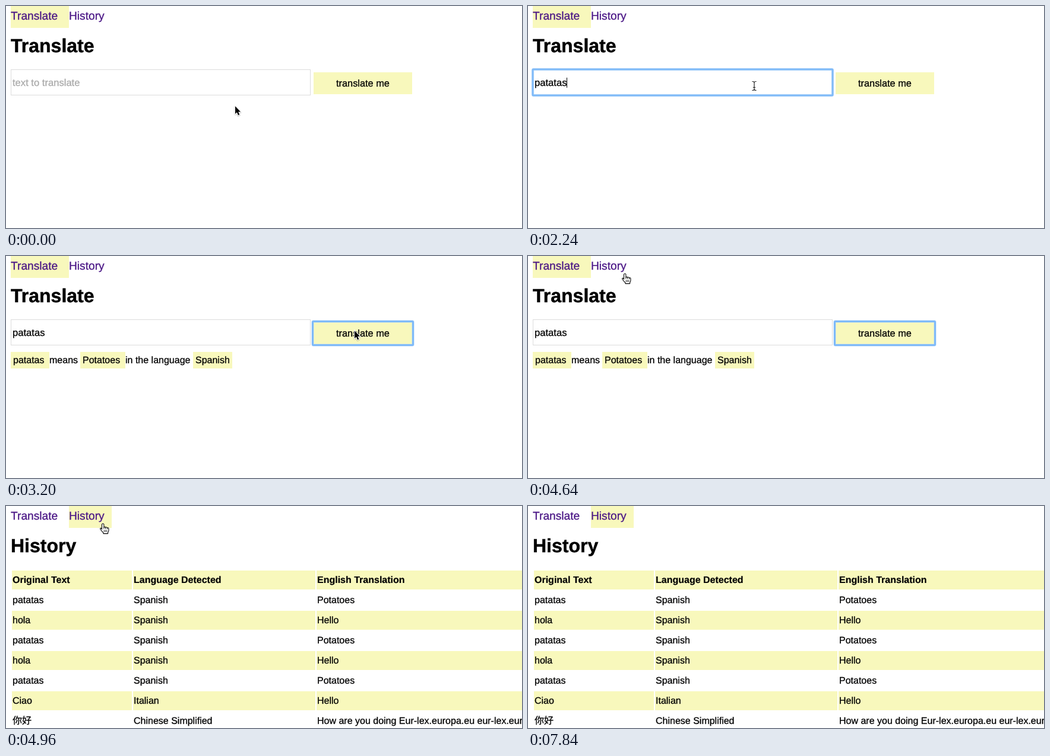
An HTML page for the animation above (8.16 s loop, 869 by 375 pixels).

```html
<!DOCTYPE html>
<html lang="en">
<head>
<meta charset="utf-8">
<title>Translate</title>
<style>
  html, body { margin: 0; width: 100%; height: 100%; overflow: hidden; background: #fff; }
  svg { display: block; width: 869px; height: 375px; }
  text { font: 16px "Liberation Sans", Arial, "Noto Sans CJK SC", "Noto Sans CJK", sans-serif; text-rendering: geometricPrecision; white-space: pre; color: #000; fill: currentColor; stroke: currentColor; stroke-width: .3; }
  .nav { font-size: 19.2px; color: #4b1786; }
  .title { font-size: 32px; font-weight: bold; stroke-width: .5; }
  .head { font-weight: bold; stroke-width: .2; }
  .field { font-size: 16.6px; }
  .label { font-size: 16.35px; }
  .mark { fill: #f8f8bc; }
  .ring { fill: none; stroke: #7fbaf8; stroke-width: 3; }
  .halo { fill: none; stroke: #b4d7fb; stroke-width: 4.4; opacity: .6; }
</style>
</head>
<body>
<svg id="stage" viewBox="0 0 869 375">
  <rect id="tab" class="mark" y="0" height="37"/>
  <text class="nav" x="8" y="23">Translate</text>
  <text class="nav" x="106" y="23">History</text>
  <text id="title" class="title" x="8" y="78"></text>

  <g id="form">
    <rect x="8.5" y="107.5" width="504" height="43" fill="#fff" stroke="#dcdcdc"/>
    <g id="inputRing">
      <rect class="halo" x="8" y="107" width="505" height="44" rx="1.5"/>
      <rect class="ring" x="8" y="107" width="505" height="44" rx="1"/>
    </g>
    <text id="field" class="field" x="11" y="135"></text>
    <rect id="caret" y="121" width="1" height="17"/>
    <rect class="mark" x="518" y="112" width="166" height="37"/>
    <g id="buttonRing">
      <rect class="halo" x="516.5" y="110.5" width="169" height="40" rx="1.5"/>
      <rect class="ring" x="516.5" y="110.5" width="169" height="40" rx="1"/>
    </g>
    <text class="label" x="556" y="136">translate me</text>
    <g id="result">
      <rect class="mark" x="8" y="162" width="65" height="28"/>
      <rect class="mark" x="125" y="162" width="76" height="28"/>
      <rect class="mark" x="315" y="162" width="66" height="28"/>
      <text x="12" y="181">patatas</text>
      <text x="73" y="181">means</text>
      <text x="129" y="181">Potatoes</text>
      <text x="201" y="181">in the language</text>
      <text x="319" y="181">Spanish</text>
    </g>
  </g>

  <g id="table"></g>

  <g id="pointer">
    <g id="arrow">
      <path d="M0 0V13L2.9 10.3L5 15.2L7.3 14.2L5.2 9.4H9.1Z" fill="none" stroke="#000" stroke-opacity=".16" stroke-width="3.6" stroke-linejoin="round" transform="translate(0 .7)"/>
      <path d="M0 0V13L2.9 10.3L5 15.2L7.3 14.2L5.2 9.4H9.1Z" stroke="#fff" stroke-width="2" paint-order="stroke"/>
    </g>
    <g id="beam" fill="none" stroke-linecap="square">
      <path d="M-3 -7.5Q0 -7.5 0 -5.5Q0 -7.5 3 -7.5M0 -5.5V5.5M-3 7.5Q0 7.5 0 5.5Q0 7.5 3 7.5M-1.5 2.5H1.5" stroke="#fff" stroke-width="2.6"/>
      <path d="M-3 -7.5Q0 -7.5 0 -5.5Q0 -7.5 3 -7.5M0 -5.5V5.5M-3 7.5Q0 7.5 0 5.5Q0 7.5 3 7.5M-1.5 2.5H1.5" stroke="#222" stroke-width="1.2"/>
    </g>
    <g id="hand" stroke="#000" stroke-width="1.1" stroke-linejoin="round" stroke-linecap="round">
      <path d="M-1.5 9.2V1.3Q-1.3 -.3 .2 -.3T1.9 1.3V6Q3.3 4.6 4.7 6.2Q6.2 5 7.5 6.8Q9.9 6.2 9.9 8.6V11.5Q9.6 13.5 8.6 14.6V16.6H.9V15Q-1.8 12.7 -4 9.2Q-4.8 7.5 -3.4 7.2Q-2.4 7.2 -1.5 9.2Z" fill="#fff"/>
      <path d="M1.9 6V8.4M4.7 6.4V8.6M7.5 7V8.8M2.3 11V13.4M4.5 11V13.4M6.7 11V13.4" fill="none" stroke-width=".9"/>
    </g>
  </g>
</svg>
<script>
const LOOP = 8160, TICK = 160;
const NS = "http://www.w3.org/2000/svg";
const $ = id => document.getElementById(id);

const rows = [
  ["Original Text", "Language Detected", "English Translation"],
  ["patatas", "Spanish", "Potatoes"],
  ["hola", "Spanish", "Hello"],
  ["patatas", "Spanish", "Potatoes"],
  ["hola", "Spanish", "Hello"],
  ["patatas", "Spanish", "Potatoes"],
  ["Ciao", "Italian", "Hello"],
  ["你好", "Chinese Simplified", "How are you doing Eur-lex.europa.eu eur-lex.europa.eu"]
];
const columns = [[10, 202], [214, 307], [523, 346]];

// time, text in the field
const typing = [[0, ""], [1280, "p"], [1600, "pa"], [1760, "pat"], [1920, "pata"], [2080, "patat"], [2240, "patatas"]];

// time, x, y of the pointer's hot spot
const path = [
  [0, 386, 169.3], [320, 384, 158], [640, 381, 139], [800, 381, 135],
  [2400, 381, 135], [2560, 402, 135], [2880, 557, 128], [3040, 587, 126.3],
  [3520, 587, 126.3], [3840, 528, 114], [4160, 340, 78], [4480, 186, 40], [4640, 163, 30],
  [6240, 163, 30], [6400, 207, 106.3], [7040, 460, 226], [7680, 740, 340]
];

function add(parent, tag, attrs, text) {
  const node = document.createElementNS(NS, tag);
  for (const key in attrs) node.setAttribute(key, attrs[key]);
  if (text) node.textContent = text;
  parent.appendChild(node);
}

rows.forEach((cells, r) => cells.forEach((cell, c) => {
  const [x, width] = columns[c], y = 109 + 34 * r;
  if (r % 2 === 0) add($("table"), "rect", { class: "mark", x, y, width, height: 32 });
  add($("table"), "text", { class: r ? "cell" : "head", x: x + 1, y: y + 21 }, cell);
}));

const show = (id, on) => $(id).setAttribute("display", on ? "inline" : "none");
const within = (t, from, to) => t >= from && t < to;

function pointerAt(t) {
  const next = path.findIndex(p => p[0] > t);
  if (next < 0) return path[path.length - 1].slice(1);
  const [t0, x0, y0] = path[next - 1], [t1, x1, y1] = path[next];
  const k = (t - t0) / (t1 - t0);
  return [x0 + (x1 - x0) * k, y0 + (y1 - y0) * k];
}

function pointerShape(t, x, y) {
  if (within(t, 4640, 6400)) return "hand";
  const overInput = x > 8 && x < 513 && y > 107 && y < 151;
  return t < 4800 && overInput ? "beam" : "arrow";
}

function draw(time) {
  const t = Math.floor(time / TICK) * TICK;
  const history = t >= 4800;

  $("tab").setAttribute("x", history ? 106 : 8);
  $("tab").setAttribute("width", history ? 72 : 98);
  $("title").textContent = history ? "History" : "Translate";
  show("form", !history);
  show("table", history);

  const typed = typing.filter(step => step[0] <= t).pop()[1];
  const field = $("field");
  field.textContent = typed || "text to translate";
  field.style.color = typed ? "#000" : "#a9a9a9";
  const focused = within(t, 800, 3040);
  show("inputRing", focused);
  show("caret", focused);
  if (focused) $("caret").setAttribute("x", typed ? Math.round(11 + field.getComputedTextLength()) : 11);
  show("buttonRing", t >= 3040);
  show("result", t >= 3200);

  const [x, y] = pointerAt(t);
  const shape = pointerShape(t, x, y);
  for (const id of ["arrow", "beam", "hand"]) show(id, id === shape);
  show("pointer", t < 7840);
  $("pointer").setAttribute("transform", `translate(${x} ${y})`);
}

const start = performance.now();
function loop() {
  draw((performance.now() - start) % LOOP);
  requestAnimationFrame(loop);
}
loop();
</script>
</body>
</html>
```
